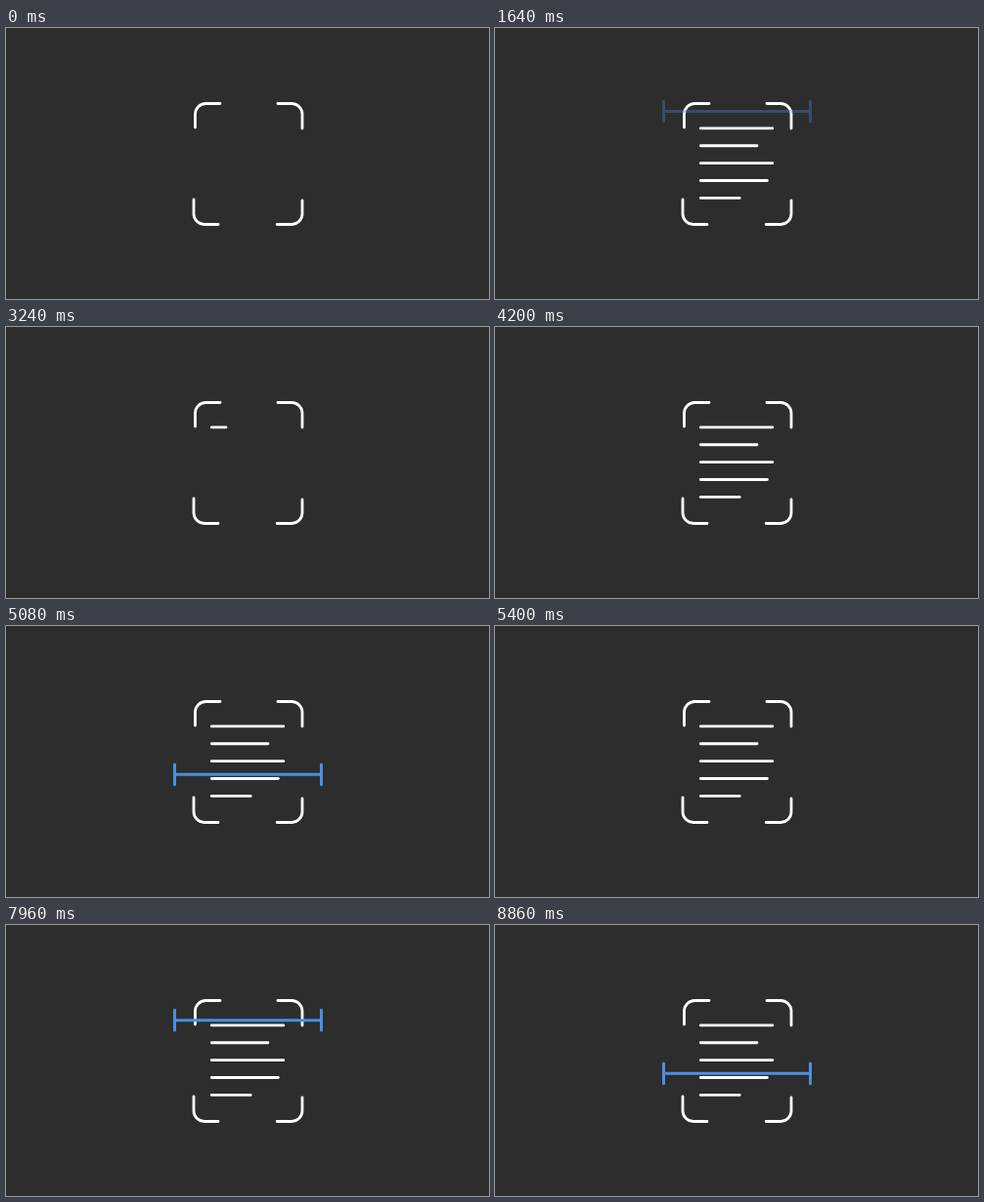
An HTML page that plays this animation: 494x278 px, repeating every 8960 ms.

```html
<!DOCTYPE html>
<html lang="en">
<head>
<meta charset="utf-8">
<title>Document scan</title>
<style>
  html, body { margin: 0; width: 100%; height: 100%; overflow: hidden; background: #2d2d2d; }
  svg { display: block; width: 494px; height: 278px; }
  path { fill: none; stroke-linecap: round; stroke-linejoin: round; }
  .white { stroke: #fff; stroke-width: 2.8; }
  #bar { stroke: #4a90e2; stroke-width: 3; }
</style>
</head>
<body>
<svg viewBox="0 0 494 278">
  <path class="white" d="M193.5 102V88.3a10.8 10.8 0 0 1 10.8-10.8H219
    M278 77.5H292.2a10.8 10.8 0 0 1 10.8 10.8V103
    M192 176V190.7a10.8 10.8 0 0 0 10.8 10.8H217
    M277.2 201.5H292.2a10.8 10.8 0 0 0 10.8-10.8V177"/>
  <g id="lines"></g>
  <g id="bar" opacity="0">
    <path d="M172.5 0H322.5M172.5-10.3V10.3M322.5-10.3V10.3"/>
  </g>
</svg>
<script>
const LOOP = 8960, STEP = 40, CYCLE = 75;
const LINE_START = 200, LINE_TIME = 200;
const SCAN_START = 1600, SCAN_TIME = 800, FADE = 120;
const left = 210.3, top1 = 102.9, gap = 17.87;
const ends = [283.8, 268, 283.8, 278.4, 250.2];

const clamp = v => Math.max(0, Math.min(1, v));
const bar = document.getElementById('bar');
const lines = ends.map(() => {
  const p = document.createElementNS('http://www.w3.org/2000/svg', 'path');
  p.setAttribute('class', 'white');
  return document.getElementById('lines').appendChild(p);
});

// The last scan runs in slow motion: each step lasts 100 ms.
function cycleTime(t) {
  if (t < 7640) return Math.floor(t / STEP) % CYCLE * STEP;
  if (t < 7760) return SCAN_START;
  return SCAN_START + STEP * (1 + Math.floor((t - 7760) / 100));
}

function draw(t) {
  const c = cycleTime(t);
  lines.forEach((p, i) => {
    const k = clamp((c - LINE_START) / LINE_TIME - i);
    const y = top1 + gap * i;
    p.setAttribute('d', k ? `M${left} ${y}H${left + (ends[i] - left) * k}` : '');
  });
  const s = c - SCAN_START;
  const opacity = clamp(Math.min(s, SCAN_TIME - s) / FADE);
  bar.setAttribute('opacity', opacity);
  bar.setAttribute('transform', `translate(0 ${79.4 + 0.152 * s})`);
}

const start = performance.now();
function tick() {
  draw((performance.now() - start) % LOOP);
  requestAnimationFrame(tick);
}
tick();
</script>
</body>
</html>
```
